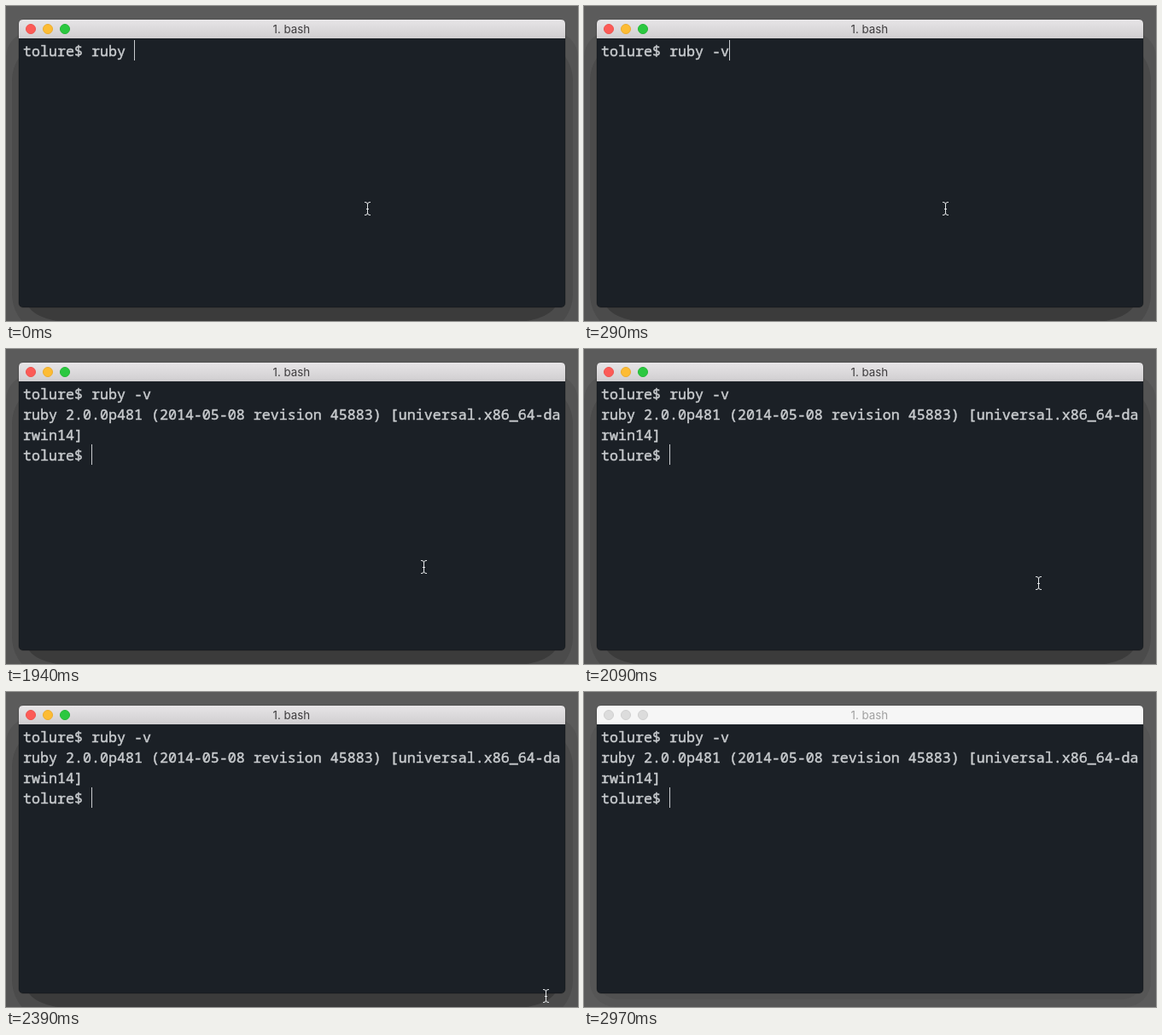
Write an HTML page that moves like this. It is 670 px wide and 370 px high and loops after 3070 ms.

```html
<!DOCTYPE html>
<html lang="en">
<head>
<meta charset="utf-8">
<title>Terminal</title>
<style>
  html, body { margin: 0; width: 100%; height: 100%; overflow: hidden; background: #5b5b5b; }
  svg { display: block; width: 670px; height: 370px; }
  #lines { font: 16.667px "Noto Sans Mono", "DejaVu Sans Mono", monospace; fill: #c9cccf; stroke: #c9cccf; stroke-width: .45; white-space: pre; }
  #title { font: 13.3px Inter, "Liberation Sans", sans-serif; fill: #3d3b3d; text-anchor: middle; }
  .inactive #title { fill: #a0a0a0; }
  .inactive #bar { fill: #f6f6f6; }
  .inactive #lights circle { fill: #dcdcdc; stroke: #d0d0d0; }
  #blurred, .inactive #focused { display: none; }
  .inactive #blurred { display: inline; }
</style>
</head>
<body>
<svg id="stage" viewBox="0 0 670 370">
  <defs>
    <linearGradient id="metal" x2="0" y2="1">
      <stop stop-color="#e7e5e7"/>
      <stop offset="1" stop-color="#d0ced0"/>
    </linearGradient>
  </defs>
  <g id="focused">
    <rect y="30" width="670" height="400" rx="30" fill="#545454"/>
    <rect x="7" y="38" width="657" height="350" rx="50" fill="#4b4b4b"/>
    <rect x="25" y="200" width="620" height="171" rx="50" ry="24" fill="#3b3b3b"/>
  </g>
  <g id="blurred">
    <rect x="7" y="30" width="657" height="340" rx="30" fill="#565656"/>
    <rect x="15" y="60" width="640" height="301" rx="25" fill="#515151"/>
  </g>
  <rect x="15" y="16" width="640" height="338" rx="5" fill="#1b2026" stroke="#000" stroke-opacity=".25"/>
  <path id="bar" d="M15 38V21q0-5 5-5H650q5 0 5 5V38Z" fill="url(#metal)"/>
  <g id="lights">
    <circle cx="29" cy="27" r="5.5" fill="#fc5b57" stroke="#ee524d"/>
    <circle cx="49" cy="27" r="5.5" fill="#fdbc34" stroke="#ecac2c"/>
    <circle cx="69" cy="27" r="5.5" fill="#2bc840" stroke="#22b835"/>
  </g>
  <text id="title" x="334.3" y="32">1. bash</text>
  <g id="lines"></g>
  <rect id="caret" width="1" height="24" fill="#c9cccf"/>
  <path id="beam" d="M-3.5-7.5h1Q0-7.5 0-5V5q0 2.5-2.5 2.5h-1M3.5-7.5h-1Q0-7.5 0-5V5q0 2.5 2.5 2.5h1M-1.5.5h3"
        fill="none" stroke="#e4e6e8"/>
</svg>
<script>
const LOOP = 3070;
const $ = id => document.getElementById(id);
const prompt = "tolure$ ";
const version = ["ruby 2.0.0p481 (2014-05-08 revision 45883) [universal.x86_64-da", "rwin14]"];

// Each step: start time, value
const screens = [
  [0, [prompt + "ruby "]],
  [140, [prompt + "ruby -"]],
  [290, [prompt + "ruby -v"]],
  [890, [prompt + "ruby -v", ...version, prompt]]
];
const pointer = [
  [0, [423.5, 238]], [1940, [489.5, 256]], [2090, [532.5, 275]], [2240, [610.5, 328]],
  [2390, [632.5, 357]], [2530, [636.5, 370]], [2680, [636.5, 400]]
];

const at = (steps, t) => steps.findLast(([start]) => start <= t)[1];

let shown;
function showText(rows) {
  if (rows === shown) return;
  shown = rows;
  $("lines").innerHTML = rows.map((row, i) => `<text x="20" y="${59.4 + 24 * i}">${row}</text>`).join("");
  $("caret").setAttribute("x", 20 + 10 * rows.at(-1).length);
  $("caret").setAttribute("y", 16 + 24 * rows.length);
}

function draw(t) {
  showText(at(screens, t));
  $("beam").setAttribute("transform", `translate(${at(pointer, t)})`);
  $("stage").classList.toggle("inactive", t >= 2970);
}

const begin = performance.now();
function tick() {
  draw((performance.now() - begin) % LOOP);
  requestAnimationFrame(tick);
}
tick();
</script>
</body>
</html>
```
